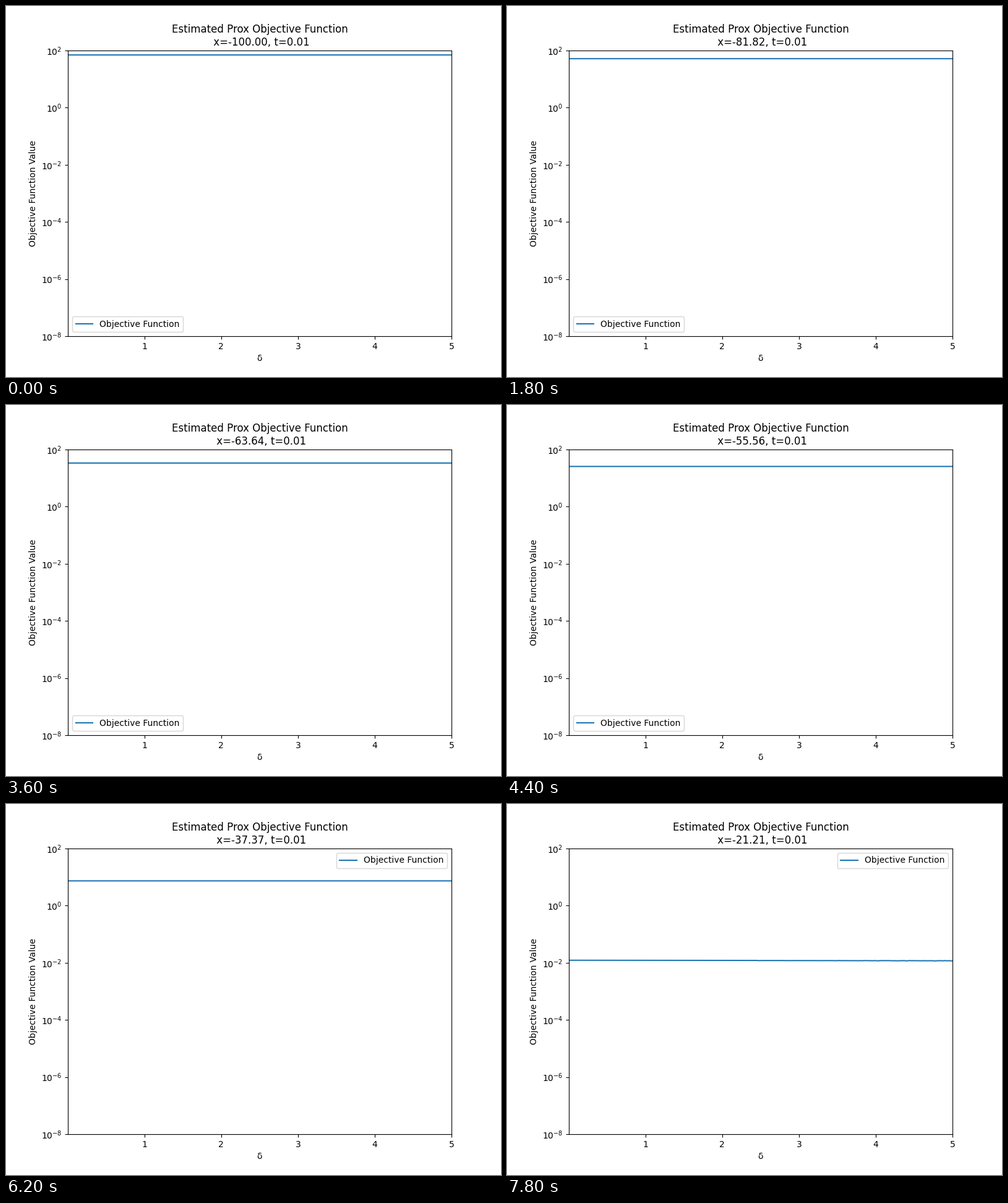
Animation, 800 px wide and 600 px high, one loop 8 s. Source, as a matplotlib script:

```python
import numpy as np
import matplotlib.pyplot as plt
from matplotlib.animation import FuncAnimation

FRAMES, INTERVAL = 40, 200
T = 0.01
EDGE = 30.0                      # half width of the flat valley

plt.rcParams["font.family"] = "DejaVu Sans"
xs = np.linspace(-100, 100, 100)
delta = np.linspace(0.002, 5, 250)


def objective(i):
    """Objective value over delta for the i-th position."""
    gap = abs(xs[i]) - EDGE
    if gap > 0:
        return np.full_like(delta, gap - T / 2)
    # inside the valley: small plateau, noisier for larger delta
    rng = np.random.default_rng(i)
    level = 0.01227 * np.tanh(-gap / 1.38)
    noise = 0.006 * rng.standard_normal(delta.size)
    return level * (1 + (noise - 0.042) * delta / 5)


fig, ax = plt.subplots(figsize=(8, 6), dpi=100)
line, = ax.plot(delta, objective(0), color="#1f77b4", lw=1.5,
                label="Objective Function")
line.set_snap(False)
ax.set_yscale("log")
ax.set_xlim(delta[0], delta[-1])
ax.set_ylim(1e-8, 1e2)
ax.set_xticks(range(1, 6))
ax.set_yticks([10.0 ** p for p in range(-8, 3, 2)])
ax.minorticks_off()
ax.set_xlabel("δ")
ax.set_ylabel("Objective Function Value")


def draw(i):
    y = objective(i)
    line.set_ydata(y)
    ax.set_title(f"Estimated Prox Objective Function\n x={xs[i]:.2f}, t={T:.2f}")
    # the legend moves up once the line has dropped below it
    ax.legend(loc="lower left" if y[0] > 20 else "upper right")
    return line,


anim = FuncAnimation(fig, draw, frames=FRAMES, interval=INTERVAL,
                     init_func=lambda: draw(0), repeat=True, repeat_delay=0,
                     blit=False)
plt.show()
```
